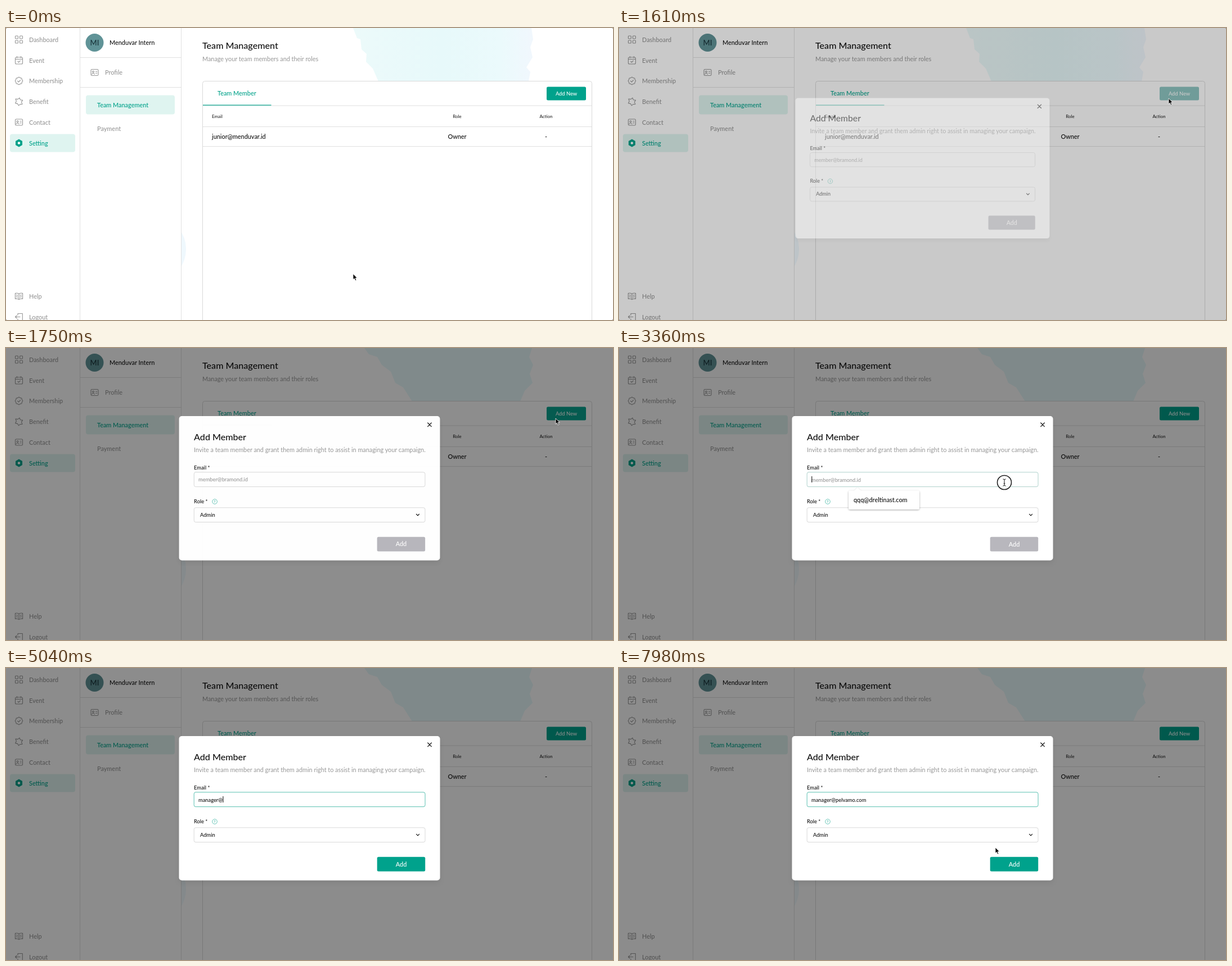
Recreate the animation shown at these times as an HTML page. Size 1079x519 px, loop 8000 ms.

```html
<!DOCTYPE html>
<html lang="en">
<head>
<meta charset="utf-8">
<title>Team Management</title>
<style>
  html, body { margin: 0; width: 100%; height: 100%; overflow: hidden; background: #666; }
  svg { display: block; width: 100vw; height: 100vh; }
  text { font: 500 10.9px Lato, sans-serif; fill: #111; }
  .grey, .grey text { fill: #979797; }
  .teal { fill: #00a28a; }
  .mid { text-anchor: middle; }
  .title { font-size: 16.1px; }
  .sub { font-weight: 400; font-size: 10.87px; }
  .head { font-weight: 400; font-size: 8px; }
  .small { font-size: 9.3px; }
  .white { fill: #fff; }
  .soft { fill: #dff4f0; }
  .icon { fill: none; stroke: #979797; stroke-width: 1.1; stroke-linejoin: round; stroke-linecap: round; }
  .line { fill: none; stroke: #e0e0e0; }
  .box { fill: #fff; stroke: #d9d9d9; }
  .mark { fill: none; stroke: #111; stroke-width: 1.2; stroke-linecap: round; stroke-linejoin: round; }
</style>
</head>
<body>
<svg viewBox="0 0 1079 519" preserveAspectRatio="none">
  <defs>
    <linearGradient id="glow">
      <stop offset="0" stop-color="#ecfafa"/>
      <stop offset=".5" stop-color="#e7f9fa"/>
      <stop offset=".82" stop-color="#ebfafc"/>
      <stop offset="1" stop-color="#f1f7fd"/>
    </linearGradient>
    <filter id="shadow" x="-20%" y="-20%" width="140%" height="150%">
      <feDropShadow dx="0" dy="5" stdDeviation="4" flood-opacity=".07"/>
    </filter>
    <filter id="lift" x="-20%" y="-30%" width="140%" height="180%">
      <feDropShadow dx="0" dy="1" stdDeviation="1.5" flood-opacity=".35"/>
    </filter>
    <g id="card-icon" class="icon">
      <rect x="-6.5" y="-5.5" width="13" height="11" rx="1.8"/>
      <circle cx="-2.5" cy="-1.3" r="1.5"/>
      <path d="M-5 3.2Q-2.5 -.2 0 3.2M2 -1.8H4.3M2 1.2H4.3"/>
    </g>
  </defs>

  <rect width="1079" height="519" rx="2" fill="#fff"/>
  <path id="blob"/>
  <ellipse cx="280" cy="393" rx="40" ry="50" fill="#eff8fd"/>

  <!-- navigation -->
  <path d="M2 0H311V519H2L0 517V2Z" fill="#fff"/>
  <path class="line" d="M131.5 0V519M311.5 0V519M131 52.5H311M131 105.5H311"/>
  <rect class="soft" x="7" y="188.5" width="116" height="32" rx="4"/>
  <g class="grey">
    <text x="41" y="24.5">Dashboard</text>
    <text x="41" y="61.5">Event</text>
    <text x="41" y="98">Membership</text>
    <text x="41" y="135">Benefit</text>
    <text x="41" y="171.5">Contact</text>
    <text x="41" y="481">Help</text>
    <text x="41" y="517.5">Logout</text>
    <text x="176" y="83">Profile</text>
    <text x="162" y="182.5">Payment</text>
  </g>
  <text class="teal" x="41" y="208.5">Setting</text>
  <g class="icon">
    <g transform="translate(23 20.5)">
      <rect x="-6.5" y="-6.5" width="5" height="5" rx="1"/><rect x="1.5" y="-6.5" width="5" height="5" rx="1"/>
      <rect x="-6.5" y="1.5" width="5" height="5" rx="1"/><rect x="1.5" y="1.5" width="5" height="5" rx="1"/>
    </g>
    <g transform="translate(23 57.5)">
      <rect x="-6.5" y="-5.5" width="13" height="12" rx="2"/>
      <path d="M-6.5 -2H6.5M-3.5 -7V-4.5M3.5 -7V-4.5M-2 2L-.5 3.5L2.3 .7"/>
    </g>
    <path transform="translate(23 94)" d="M0 -6.8L2.2 -5.4L4.8 -4.8L5.4 -2.2L6.8 0L5.4 2.2L4.8 4.8L2.2 5.4L0 6.8L-2.2 5.4L-4.8 4.8L-5.4 2.2L-6.8 0L-5.4 -2.2L-4.8 -4.8L-2.2 -5.4ZM-2.4 .2L-.6 2L2.6 -1.4"/>
    <path transform="translate(23 131)" d="M-6 -5L-2 -4.4L1 -6.8L2.6 -3.2L6.6 -2.6L4.4 .6L6 4.4L2 4.6L-.6 6.8L-2.4 3.6L-6.4 2.6L-4.6 -1Z"/>
    <path transform="translate(23 477)" d="M0 -4.5Q-3 -6.4 -6.6 -5.4V4.4Q-3 3.6 0 5.6Q3 3.6 6.6 4.4V-5.4Q3 -6.4 0 -4.5V5.6M-4.6 -2.4L-2 -1.8M-4.6 .6L-2 1.2M4.6 -2.4L2 -1.8M4.6 .6L2 1.2"/>
    <path transform="translate(23 513.5)" d="M-2 -3V-6H6.3V6.5H-2V3.5M2 0H-6.5M-4 -2.5L-6.5 0L-4 2.5"/>
  </g>
  <use href="#card-icon" x="23" y="167.5"/>
  <use href="#card-icon" x="157.5" y="79"/>
  <path class="teal" d="M23 197.5L29 201V208L23 211.5L17 208V201Z"/>
  <circle class="white" cx="23" cy="204.5" r="2.2"/>

  <circle cx="157.5" cy="26" r="16" fill="#609397"/>
  <text class="mid" x="157.5" y="30.5" style="font-size:13px;fill:#19343a">MI</text>
  <text x="184" y="30">Menduvar Intern</text>
  <rect class="soft" x="142" y="119.5" width="158" height="34" rx="4"/>
  <text class="teal" x="162" y="140.5">Team Management</text>

  <!-- team table -->
  <text class="title" x="349" y="37">Team Management</text>
  <text class="sub grey" x="349" y="58.5">Manage your team members and their roles</text>
  <rect class="box" x="349.5" y="94.5" width="692" height="440" rx="4"/>
  <path class="line" d="M350 138H1041M350 175.5H1041M350 210.5H1041"/>
  <rect class="teal" x="350" y="136.5" width="121.5" height="1.2"/>
  <text class="teal" x="376" y="120">Team Member</text>
  <rect id="newButton" x="961" y="104.5" width="70" height="24" rx="2.5"/>
  <text class="mid white small" x="996" y="120">Add New</text>
  <text class="head" x="366" y="159.5">Email</text>
  <text class="head mid" x="802" y="159.5">Role</text>
  <text class="head mid" x="960" y="159.5">Action</text>
  <text x="366" y="196.5">junior@menduvar.id</text>
  <text class="mid" x="802" y="196.5">Owner</text>
  <text class="mid" x="960" y="196.5">-</text>

  <rect id="shade" width="1079" height="519" rx="2"/>

  <g id="dialog">
    <rect class="white" x="307.5" y="121" width="464" height="256.5" rx="5" filter="url(#shadow)"/>
    <path class="mark" d="M749.7 133L756.3 139.6M756.3 133L749.7 139.6"/>
    <text class="title" x="334" y="163.5">Add Member</text>
    <text class="sub grey" x="334" y="185">Invite a team member and grant them admin right to assist in managing your campaign.</text>
    <text class="small" x="334" y="216">Email *</text>
    <rect id="field" class="box" x="334.2" y="220.8" width="410.8" height="25.8" rx="3"/>
    <text id="hint" class="small grey" x="342" y="237.5">member@bramond.id</text>
    <text id="entry" class="small" x="342" y="237.5"></text>
    <rect id="caret" y="228" width="1" height="11"/>
    <text class="small" x="334" y="276.2">Role *</text>
    <circle cx="371" cy="273" r="4.3" fill="none" stroke="#5cc0b1" stroke-width=".9"/>
    <text class="mid teal" x="371" y="275.4" style="font-size:6.5px">?</text>
    <rect class="box" x="334.2" y="283.8" width="410.8" height="25.8" rx="3"/>
    <text class="small" x="345" y="299.8">Admin</text>
    <path class="mark" d="M729.5 295.3L732 297.9L734.5 295.3"/>
    <rect id="addButton" x="659.7" y="335.8" width="85.5" height="25.8" rx="2.5"/>
    <text class="mid white" x="702.5" y="352.5">Add</text>
    <g id="suggestion">
      <path class="white" filter="url(#lift)" d="M411 253.5H418L424 248.5L430 253.5H531Q534 253.5 534 256.5V284Q534 287 531 287H411Q408 287 408 284V256.5Q408 253.5 411 253.5Z"/>
      <text x="417" y="274">qqq@dreltinast.com</text>
    </g>
  </g>

  <g id="pointer">
    <circle id="press" r="12.5" fill="#fff" fill-opacity=".7" stroke="#222" stroke-width="1.6"/>
    <path id="arrow" d="M0 0V10.2L2.3 8.1L4 12L5.8 11.2L4.1 7.4H7.2Z" stroke="#fff" stroke-width=".8"/>
    <path id="hand" d="M-1 1Q0 -.6 1 1V4.6L5 5.4Q6.4 5.8 6.2 7.6L5.2 12H-.4L-3.6 7.8Q-3.6 6.2 -1 7.6Z" fill="#fff" stroke="#111" stroke-linejoin="round"/>
    <path id="beam" d="M-2.5 -6Q0 -6 0 -4.5Q0 -6 2.5 -6M0 -4.5V4.5M-2.5 6Q0 6 0 4.5Q0 6 2.5 6M-1.3 1.8H1.3" fill="none" stroke="#111"/>
  </g>
</svg>
<script>
const LOOP = 8000, STEP = 70, SHADE = 0.45;
const TEAL = [0, 162, 140], HOVER = [199, 212, 215], DISABLED = [184, 183, 189];
const BORDER = [217, 217, 217], FOCUS = [90, 192, 177];
const ADDRESS = 'manager@pelvamo.com';
const KEY_TIMES = [3850, 4060, 4200, 4410, 4550, 4690, 4760, 5040, 5320, 5600,
  5670, 5810, 5950, 6020, 6160, 6370, 6580, 6650, 7000];
// time, x, y of the pointer's hot spot
const PATH = [[0, 617, 437], [840, 971, 131], [980, 973, 127], [1050, 973, 127], [1120, 977, 125],
  [1890, 977, 125], [2730, 697, 232], [2940, 685, 239], [7490, 685, 239], [7980, 669, 319]];
const BLOB_LIGHT = 'M617 0L624 18L630 20L632 38L641 46L640 60L652 72L662 95H929L932 78L925 70L936 52L932 34L937 20L934 0Z';
const BLOB_SHADED = 'M637 0L645 11L660 16L668 30L684 42L692 62L706 70L722 95H914L922 76L936 62L931 46L937 30L930 16L935 0Z';

const el = Object.fromEntries([...document.querySelectorAll('[id]')].map(e => [e.id, e]));
const ramp = (t, from, to) => Math.min(1, Math.max(0, (t - from) / (to - from)));
const ease = u => u * u * (3 - 2 * u);
const mix = (a, b, u) => `rgb(${a.map((v, i) => Math.round(v + (b[i] - v) * u))})`;
const show = (node, visible) => node.setAttribute('visibility', visible ? 'visible' : 'hidden');

function pointerAt(t) {
  const next = Math.max(1, PATH.findIndex(p => p[0] >= t));
  const [t0, x0, y0] = PATH[next - 1], [t1, x1, y1] = PATH[next];
  const u = ease(ramp(t, t0, t1));
  return [x0 + (x1 - x0) * u, y0 + (y1 - y0) * u];
}

function drawPointer(t) {
  const [x, y] = pointerAt(t);
  const visible = t < 3850 || t >= 7560;
  const hand = t >= 1120 && t < 1610;
  const beam = t > 1890 && x < 745 && y > 221 && y < 247;
  el.pointer.setAttribute('transform', `translate(${x} ${y})`);
  show(el.hand, visible && hand);
  show(el.beam, visible && beam);
  show(el.arrow, visible && !hand && !beam);
  show(el.press, t >= 3220 && t < 3430);
}

function drawDialog(t) {
  const open = 1 - (1 - ramp(t, 1550, 1770)) ** 2;
  el.shade.setAttribute('opacity', open * SHADE);
  el.dialog.setAttribute('opacity', open);
  el.dialog.setAttribute('transform',
    `translate(539.5 249) scale(${0.95 + 0.05 * open}) translate(-539.5 -249)`);
  el.blob.setAttribute('d', open > 0.6 ? BLOB_SHADED : BLOB_LIGHT);
  el.blob.setAttribute('fill', open > 0.6 ? '#e6f8fa' : 'url(#glow)');

  const typed = KEY_TIMES.filter(k => k <= t).length;
  el.entry.textContent = ADDRESS.slice(0, typed);
  show(el.hint, !typed);
  show(el.suggestion, t >= 3360 && !typed);
  show(el.caret, t >= 3360 && t < 7560);
  el.caret.setAttribute('x', 342.3 + (typed ? el.entry.getComputedTextLength() : 0));
  el.field.style.stroke = mix(BORDER, FOCUS, ramp(t, 3290, 3500));
  el.addButton.style.fill = mix(DISABLED, TEAL, ramp(t, 3850, 4150));
}

function frame() {
  const t = Math.floor(performance.now() % LOOP / STEP) * STEP;
  const hover = ramp(t, 1050, 1330) - ramp(t, 1550, 1760);
  el.newButton.style.fill = mix(TEAL, HOVER, hover);
  drawDialog(t);
  drawPointer(t);
  requestAnimationFrame(frame);
}
frame();
</script>
</body>
</html>
```
